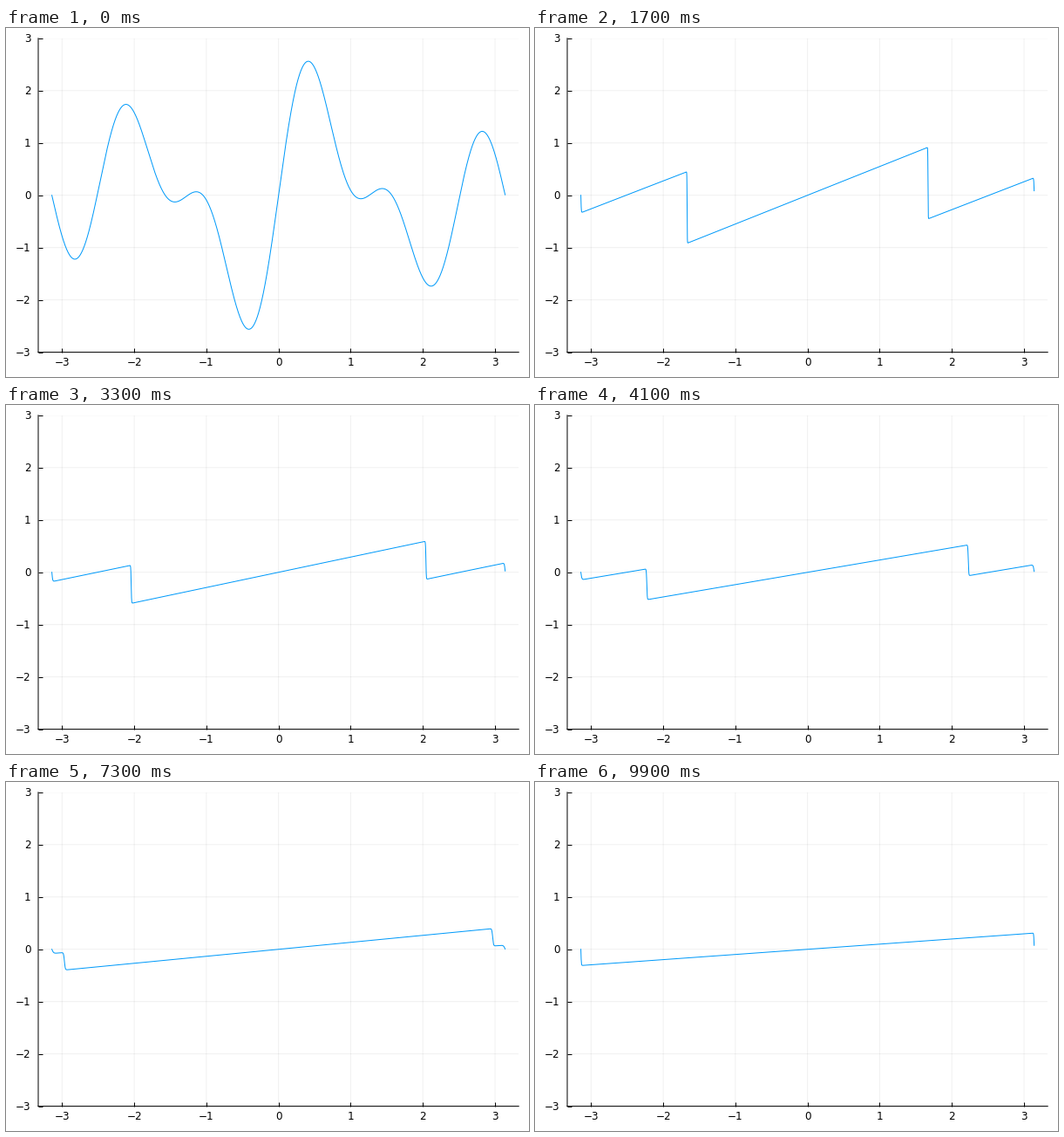
A matplotlib script that plays this animation: 600 by 400 pixels, repeating every 10000 ms.

```python
import numpy as np
import matplotlib.pyplot as plt
from matplotlib.animation import FuncAnimation

# Viscous Burgers equation u_t + u u_x = NU u_xx on a periodic domain,
# evaluated exactly with the Cole-Hopf transform.
W, H, DPI = 600, 400, 100
FRAMES, T_END = 100, 10.0
NU, N = 0.001, 4000
MODES = (2, 3, 5)
PX = 72 / DPI  # one pixel in points

x = np.linspace(-np.pi, np.pi, N + 1)[:-1]
times = np.linspace(0, T_END, FRAMES)

y = np.arange(-0.6, 6.9, 0.006)
potential = sum((1 - np.cos(k * y)) / k for k in MODES).astype(np.float32)
gap = (x[N // 2:, None] - y).astype(np.float32)
gap_sq = gap**2


def solve(t):
    if t == 0:
        return sum(np.sin(k * x) for k in MODES)
    cost = gap_sq * np.float32(0.5 / t) + potential
    cost -= cost.min(axis=1, keepdims=True)
    weight = np.exp(cost * np.float32(-0.5 / NU))
    u = (gap * weight).sum(axis=1) / (t * weight.sum(axis=1))
    return np.concatenate(([0], -u[:0:-1], u))  # odd symmetry


fig = plt.figure(figsize=(W / DPI, H / DPI), dpi=DPI, facecolor="white")
left, right, top, bottom = 37.0, 588.2, 11.8, 371.6
ax = fig.add_axes([left / W, 1 - bottom / H, (right - left) / W, (bottom - top) / H])

pad = 0.03 * (x[-1] - x[0])
ax.set_xlim(x[0] - pad, x[-1] + pad)
ax.set_ylim(-3, 3)
ticks = np.arange(-3, 4)
ax.set_xticks(ticks)
ax.set_yticks(ticks)
ax.tick_params(direction="in", length=4.7 * PX, width=PX,
               labelbottom=False, labelleft=False)
ax.set_axisbelow(True)
ax.grid(color="black", alpha=0.06, linewidth=PX)
ax.spines[["top", "right"]].set_visible(False)
ax.spines[["left", "bottom"]].set_linewidth(PX)

# Keep the frame, grid and ticks at their subpixel positions.
for artist in (*ax.spines.values(), *ax.get_xgridlines(), *ax.get_ygridlines(),
               *ax.get_xticklines(), *ax.get_yticklines()):
    artist.set_snap(False)


def label(px, py, value, ha):
    text = str(value).replace("-", "\u2212")
    fig.text(px / W, 1 - py / H, text, ha=ha, va="baseline",
             family="DejaVu Sans", size=12 * PX, color="black")


for v in ticks:
    px, py = ax.transData.transform((v, v))
    label(px, 387.4, v, "center")
    label(28.4, H - py + 4.1, v, "right")

line, = ax.plot([], [], color="#009afa", linewidth=PX)


def update(i):
    line.set_data(x, solve(times[i]))
    return line,


anim = FuncAnimation(fig, update, frames=FRAMES, interval=100, repeat=True,
                     repeat_delay=0)
plt.show()
```
